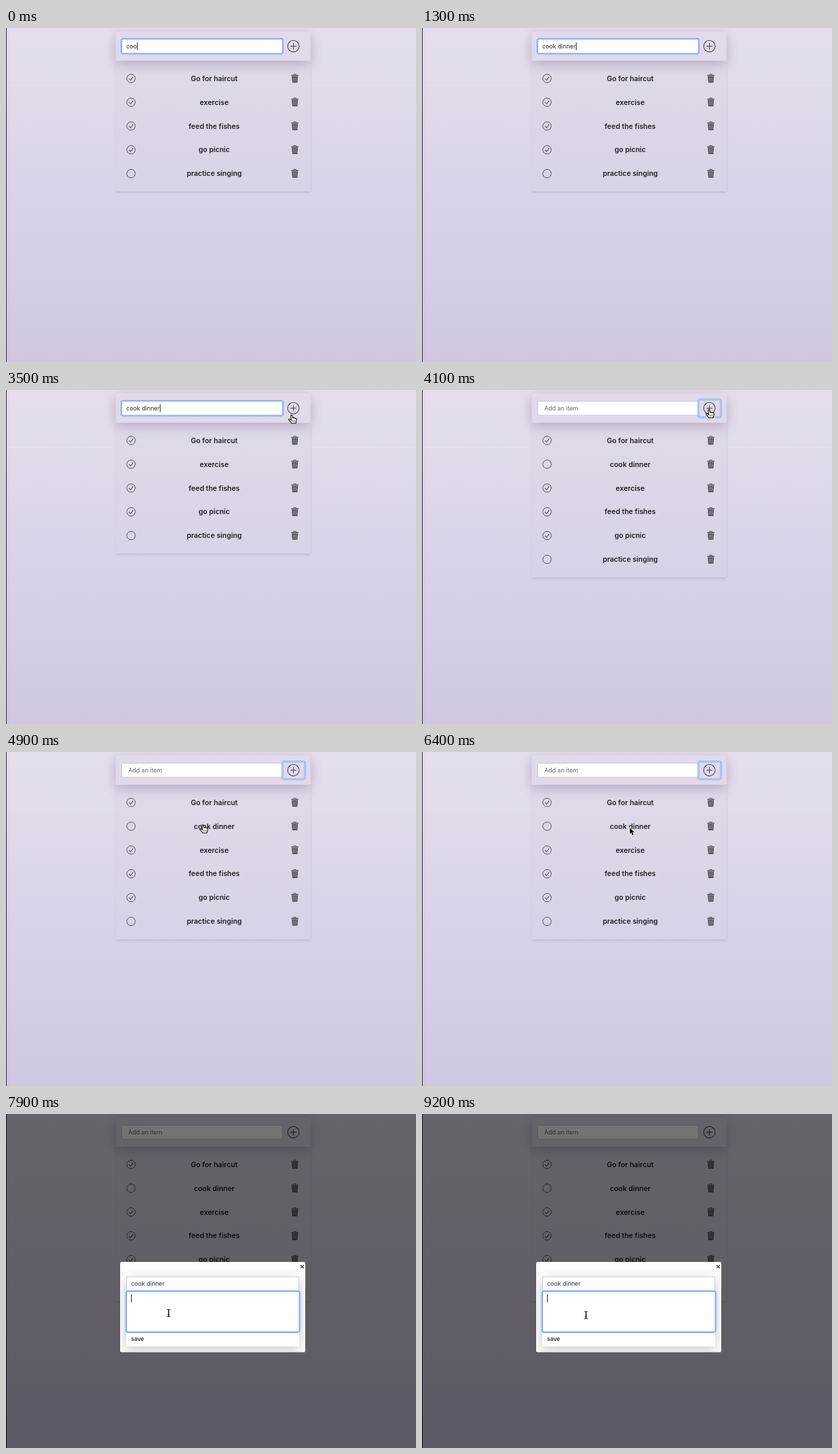
An HTML page with a canvas that plays this animation: 600 px wide and 490 px high, repeating every 9400 ms.

```html
<!DOCTYPE html>
<html lang="en">
<head>
<meta charset="utf-8">
<title>To-do list</title>
<style>
  html, body { margin: 0; width: 100%; height: 100%; overflow: hidden; }
  canvas { display: block; width: 600px; height: 490px; }
</style>
</head>
<body>
<canvas id="stage" width="600" height="490"></canvas>
<script>
const ctx = document.getElementById('stage').getContext('2d');
const LOOP = 9400, STEP = 100;
const ADDED = 4100, DIALOG = 6500, NOTE_FOCUS = 7900;
const ROW_TOP = 74, ROW_STEP = 34.9;
const INK = '#222026', ICON = '#57535c';
const SMALL = '8.75px Inter, "Liberation Sans", sans-serif';
const SAVE = '500 8.5px Inter, "Liberation Sans", sans-serif';
const TITLE = '600 10.4px Inter, "Liberation Sans", sans-serif';

const oldItems = ['Go for haircut', 'exercise', 'feed the fishes', 'go picnic', 'practice singing'];
const newItems = [oldItems[0], 'cook dinner', ...oldItems.slice(1)];
const openItems = ['cook dinner', 'practice singing'];

// Moments at which one more character of the new item appears
const keyTimes = [200, 400, 600, 700, 800, 1100, 1200, 1300];

// Pointer path: time, x, y of the hot spot
const path = [
  [2100, 355, 2], [2300, 342, 22], [2600, 315, 44], [2800, 319, 45],
  [3100, 392, 45], [3300, 428, 42], [3500, 418, 37], [3700, 420, 29],
  [4400, 420, 29], [4900, 288, 107], [5100, 276, 108], [5400, 289, 110],
  [5600, 294, 110], [6400, 304, 111], [6500, 305, 112], [6800, 305, 112],
  [7100, 268, 205], [7400, 238, 292], [8800, 238, 292], [9200, 240, 295]
];

function pointerAt(t) {
  if (t < path[0][0]) return null;
  const i = path.findIndex(p => p[0] > t);
  if (i < 0) return path[path.length - 1].slice(1);
  const [t0, x0, y0] = path[i - 1], [t1, x1, y1] = path[i];
  const k = (t - t0) / (t1 - t0);
  return [x0 + (x1 - x0) * k, y0 + (y1 - y0) * k];
}

function pointerKind(t, y) {
  if (t >= DIALOG) return y > 238 ? 'beam' : 'arrow';
  const onButton = t >= 3400 && t < 4600;
  const onItem = t >= 4800 && t < 6400;
  return onButton || onItem ? 'hand' : 'arrow';
}

function box(x, y, w, h, fill, stroke, line = 1, radius = 0) {
  ctx.beginPath();
  ctx.roundRect(x, y, w, h, radius);
  if (fill) { ctx.fillStyle = fill; ctx.fill(); }
  if (stroke) { ctx.strokeStyle = stroke; ctx.lineWidth = line; ctx.stroke(); }
}

function shadowBox(x, y, w, h, fill, color, blur, dy) {
  ctx.save();
  ctx.shadowColor = color;
  ctx.shadowBlur = blur;
  ctx.shadowOffsetY = dy;
  box(x, y, w, h, fill);
  ctx.restore();
}

function line(points, color, width = 1) {
  ctx.beginPath();
  points.forEach(([x, y]) => ctx.lineTo(x, y));
  ctx.strokeStyle = color;
  ctx.lineWidth = width;
  ctx.stroke();
}

function circle(x, y, r, color, width) {
  ctx.beginPath();
  ctx.arc(x, y, r, 0, Math.PI * 2);
  ctx.strokeStyle = color;
  ctx.lineWidth = width;
  ctx.stroke();
}

function text(str, x, y, font, color, align = 'left') {
  ctx.font = font;
  ctx.fillStyle = color;
  ctx.textAlign = align;
  ctx.fillText(str, x, y);
}

function focusRing(x, y, w, h, fill, color) {
  box(x, y, w, h, fill, 'rgba(130,175,245,.35)', 4, 3);
  box(x, y, w, h, fill, color, 2, 2);
}

function drawBackground() {
  const g = ctx.createLinearGradient(0, 0, 0, 490);
  g.addColorStop(0, '#e5deed');
  g.addColorStop(1, '#cfc7e0');
  ctx.fillStyle = g;
  ctx.fillRect(0, 0, 600, 490);
  ctx.fillStyle = 'rgba(255,255,255,.14)';
  ctx.fillRect(0, 84, 600, 1);
  ctx.fillStyle = '#2d2933';
  ctx.fillRect(0, 0, 1, 490);
}

function drawTrash(y) {
  ctx.save();
  ctx.translate(422.7, y);
  box(-2.2, -6.2, 4.4, 2, null, ICON, 1, .6);
  box(-5.3, -5.1, 10.6, 1.5, ICON);
  ctx.beginPath();
  ctx.moveTo(-4.5, -3.1);
  ctx.lineTo(4.5, -3.1);
  ctx.lineTo(3.7, 6.2);
  ctx.lineTo(-3.7, 6.2);
  ctx.fill();
  for (const x of [-1.9, 0, 1.9]) line([[x * 1.1, -1.6], [x, 4.6]], '#aaa3b4', .7);
  ctx.restore();
}

function drawList(items) {
  const height = 17.5 + items.length * ROW_STEP;
  shadowBox(160.5, 48, 285, height, '#ddd6e7', 'rgba(70,50,90,.22)', 3, 1);
  const g = ctx.createLinearGradient(0, 48, 0, 275);
  g.addColorStop(0, '#e0d9e9');
  g.addColorStop(1, '#d9d1e5');
  ctx.fillStyle = g;
  ctx.fillRect(160.5, 48, 285, height);
  items.forEach((item, i) => {
    const y = ROW_TOP + i * ROW_STEP;
    circle(183, y, 6.2, ICON, 1);
    if (!openItems.includes(item)) line([[180, y + .3], [182.2, y + 2.4], [186.2, y - 2.3]], ICON, 1.1);
    text(item, 304.7, y + 3.7, TITLE, INK, 'center');
    drawTrash(y);
  });
}

function drawHeader(t) {
  shadowBox(160.5, 5, 285, 43, '#e1daea', 'rgba(60,40,85,.27)', 18, 5);
  if (t < ADDED) {
    focusRing(169, 16, 236, 21.5, '#fff', '#8fb4f2');
    const typed = 'cook dinner'.slice(0, 3 + keyTimes.filter(k => k <= t).length);
    text(typed, 176, 30, SMALL, '#29262d');
    const lit = t < 1800 || (t >= 2400 && t < 2900) || (t >= 3400 && t < 3900);
    if (lit) {
      ctx.fillStyle = '#222';
      ctx.fillRect(176.3 + ctx.measureText(typed).width, 21, 1, 11.5);
    }
  } else {
    box(169.5, 16.5, 235, 20.5, '#fff', '#cdc6d5');
    text('Add an item', 179, 30, SMALL, '#66636b');
    if (t < DIALOG) focusRing(404.5, 14, 33, 26, null, '#a5c1f1');
  }
  circle(420.6, 26.7, 8.4, '#4b4751', 1.1);
  line([[416.1, 26.7], [425.1, 26.7]], '#4b4751', 1.1);
  line([[420.6, 22.2], [420.6, 31.2]], '#4b4751', 1.1);
}

function drawDialog(t) {
  const writing = t >= NOTE_FOCUS;
  ctx.fillStyle = 'rgba(0,0,0,.55)';
  ctx.fillRect(0, 0, 600, 490);
  box(167, 217, 271, 132.5, '#fff', null, 1, 2);
  ctx.save();
  ctx.beginPath();
  ctx.rect(167, 217, 271, 132.5);
  ctx.clip();
  shadowBox(176, 238.5, 253, 102.5, '#fff', 'rgba(0,0,0,.22)', 18, 5);
  ctx.restore();

  box(176.5, 239, 252, 20.5, '#fff', '#cbcbcd');
  text('cook dinner', 183, 252.3, SMALL, '#29262d');
  if (writing) focusRing(176, 260, 253.5, 60, '#fff', '#80b1f1');
  else box(176.5, 260, 252, 60, '#fff', '#b4b4b7');
  text('save', 183, 333, SAVE, '#161616');

  if (!writing) {
    box(429.3, 216, 8.8, 14, '#fff', '#8cb5ef', 3, 2);
    box(429.3, 216, 8.8, 14, '#fff', '#1c559f', 1.4, 2);
  }
  const ink = writing ? '#555' : '#151515';
  line([[431.2, 221.6], [435.8, 226.2]], ink, 1.6);
  line([[435.8, 221.6], [431.2, 226.2]], ink, 1.6);

  if (writing && (t < 8400 || t >= 8900)) {
    ctx.fillStyle = '#222';
    ctx.fillRect(183, 264.5, 1, 11.5);
  }
}

const arrow = new Path2D('M0 0V9.3L2.2 7.3L3.8 10.9L5.5 10.1L3.9 6.7H6.8Z');
const hand = new Path2D('M-1.2 .8C-1.2-.5 .8-.5 1 .8L1.8 4.2C2.2 3.4 3.5 3.5 3.7 4.4C4.2 3.7 5.3 3.8 5.6 4.8C6.3 4.3 7.1 4.8 7.2 5.7C7.4 8 6.8 9.5 6 11.8H-.2C-1.2 9.8-3 8.3-4.2 6.7C-4.7 5.7-3.4 5-2.5 5.9L-.4 7.3Z');

function drawPointer(t) {
  const pos = pointerAt(t);
  if (!pos) return;
  const kind = pointerKind(t, pos[1]);
  ctx.save();
  ctx.translate(...pos);
  ctx.lineJoin = 'round';
  if (kind === 'arrow') {
    ctx.strokeStyle = '#fff';
    ctx.lineWidth = 1.8;
    ctx.stroke(arrow);
    ctx.fillStyle = '#000';
    ctx.fill(arrow);
  } else if (kind === 'hand') {
    ctx.fillStyle = '#fff';
    ctx.fill(hand);
    ctx.strokeStyle = '#111';
    ctx.lineWidth = 1.1;
    ctx.stroke(hand);
    for (const x of [1.4, 3.1, 4.8]) line([[x, 7.3], [x + .1, 9.8]], '#333', .7);
  } else {
    for (const [color, width] of [['#fff', 2.6], ['#222', 1.1]]) {
      line([[-2.6, -5.3], [-.8, -5.3], [0, -4.4], [0, 4.4], [-.8, 5.3], [-2.6, 5.3]], color, width);
      line([[2.6, -5.3], [.8, -5.3], [0, -4.4], [0, 4.4], [.8, 5.3], [2.6, 5.3]], color, width);
      line([[-1.4, 2], [1.4, 2]], color, width);
    }
  }
  ctx.restore();
}

const start = performance.now();

function frame() {
  const elapsed = (performance.now() - start) % LOOP;
  const t = Math.floor(elapsed / STEP) * STEP;
  drawBackground();
  drawList(t < ADDED ? oldItems : newItems);
  drawHeader(t);
  if (t >= DIALOG) drawDialog(t);
  drawPointer(t);
  requestAnimationFrame(frame);
}
frame();
</script>
</body>
</html>
```
